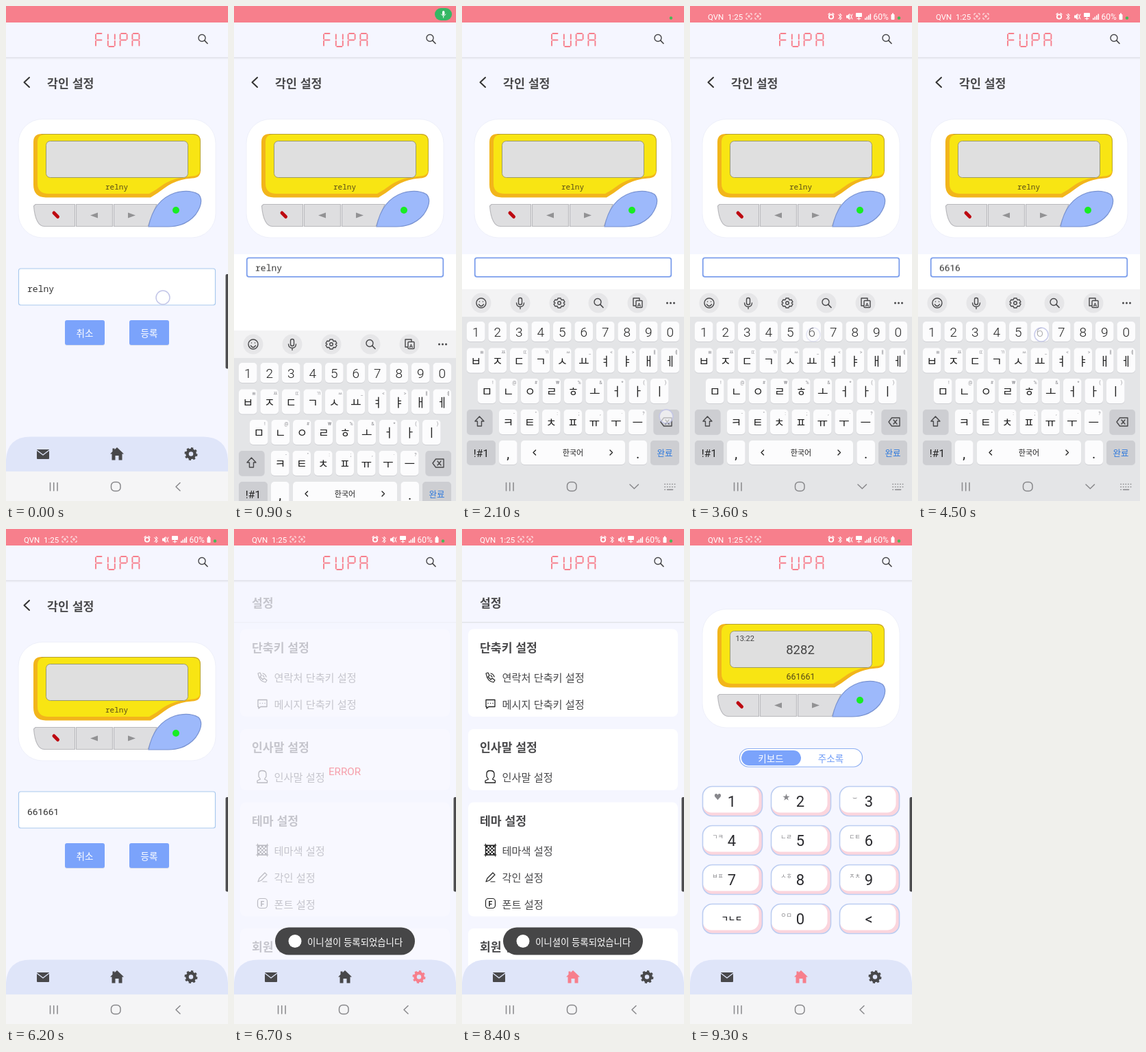
Write an HTML page that moves like this. It is 324 by 720 pixels and loops after 9800 ms.

```html
<!DOCTYPE html>
<html lang="ko">
<head>
<meta charset="utf-8">
<title>각인 설정</title>
<style>
html, body { margin: 0; width: 100%; height: 100%; overflow: hidden; background: #f5f6ff; }
svg { display: block; width: 100vw; height: 100vh; }
text { font-family: Roboto, "Noto Sans CJK KR", "Noto Sans CJK JP", "DejaVu Sans", sans-serif; dominant-baseline: central; white-space: pre; }
.mono { font-family: "Noto Sans Mono", monospace; }
.ko { font-family: "Noto Sans CJK KR", "Noto Sans CJK JP", sans-serif; transform: translateY(-1px); }
.bold { font-weight: 700; }
.thin { font-weight: 300; }
.mid { text-anchor: middle; }
.line { fill: none; stroke-linecap: round; stroke-linejoin: round; }
</style>
</head>
<body>
<svg id="stage" viewBox="0 0 324 720" preserveAspectRatio="none"></svg>
<script>
const LOOP = 9800;
const INK = '#48484a', BLUE = '#7ba3fb', PINK = '#f77f8c', PAPER = '#f5f6ff';
const OLD_NAME = 'relny', NEW_NAME = '661661';

// Drawing helpers
const text = (x, y, size, s, fill = INK, cls = '', extra = '') =>
  `<text x="${x}" y="${y}" font-size="${size}" fill="${fill}" class="${cls}" ${extra}>${s}</text>`;
const rect = (x, y, w, h, fill, r = 0, extra = '') =>
  `<rect x="${x}" y="${y}" width="${w}" height="${h}" rx="${r}" fill="${fill}" ${extra}/>`;
const shape = (d, fill, extra = '') => `<path d="${d}" fill="${fill}" ${extra}/>`;
const line = (d, color = INK, w = 1.4, extra = '') =>
  `<path class="line" d="${d}" stroke="${color}" stroke-width="${w}" ${extra}/>`;
const dot = (x, y, r, fill, extra = '') => `<circle cx="${x}" cy="${y}" r="${r}" fill="${fill}" ${extra}/>`;
const ring = (x, y, r, color = INK, w = 1.4, extra = '') =>
  dot(x, y, r, 'none', `stroke="${color}" stroke-width="${w}" ${extra}`);
const group = (id, body, extra = '') => `<g id="${id}" ${extra}>${body}</g>`;
const glass = (x, y, r, w) => ring(x - 1.5, y - 1.5, r, INK, w) + line(`M${x + 2.2} ${y + 2.2}l4.300 4.300`, INK, w + .3);

// Seven-segment wordmark
const SEGMENTS = ['M1.5 0H8.5', 'M10 1.5V8.5', 'M10 11.5V18.5', 'M1.5 20H8.5', 'M0 11.5V18.5', 'M0 1.5V8.5', 'M1.5 10H8.5'];
const LETTERS = { F: [0, 4, 5, 6], U: [1, 2, 3, 4, 5], P: [0, 1, 4, 5, 6], A: [0, 1, 2, 4, 5, 6] };
const wordmark = [...'FUPA'].map((c, i) =>
  line(LETTERS[c].map(k => SEGMENTS[k]).join(''), PINK, 1.9, `transform="translate(${131 + i * 17.8} 40) scale(1 .95)"`)).join('');

function pager(label, lcd = '') {
  const edge = 'stroke="#b9b9bd" stroke-width="1.2"';
  return rect(18, 164.5, 288, 172.5, '#fff', 35, 'stroke="#eef0fa"') +
    shape('M52 186H273Q284 186 284 197V239Q284 250 272 250.500Q248 252 231 265Q222 272 211 278.500H58Q40 278 40 260V198Q40 186 52 186Z', '#f2b51b') +
    shape('M57 187H273Q283.500 187 283.500 197V237Q283.500 247 272 247.500Q246 249 229 260Q220 267 209 273H62Q46 273 46 258V198Q46 187 57 187Z', '#f8e513') +
    line('M52 186.500H273Q283.500 187 283.500 197V240', '#a99c3a', .8) +
    rect(58.5, 196.500, 207, 53, '#dfdfdf', 6, 'stroke="#9b9a6c"') + lcd +
    text(161.5, 262, label === OLD_NAME ? 11 : 12.4, label, '#574a18', label === OLD_NAME ? 'mono mid' : 'mid') +
    shape('M43 288.500H100.500V320.500H56Q43 320 40.500 291Z', '#dedee0', edge) +
    shape('M102.500 288.500H155.500V320.500H102.500Z', '#dedee0', edge) +
    shape('M157.500 288.500H220L207 320.500H157.500Z', '#dedee0', edge) +
    line('M70 301L75.500 306.500', '#bd0711', 5) +
    shape('M123 304.500L134 300.500V308.500Z', '#929294') + shape('M189 304.500L178 300.500V308.500Z', '#929294') +
    shape('M208 321Q216 282 246 272Q267 266 281 274Q290 284 277 303Q262 321 237 321Z', '#9db9fb', 'stroke="#7892d1" stroke-width="1.2"') +
    dot(248, 297, 5, '#17ed22');
}

const house = shape('M162 642L172 651.500H169.500V660.500H164.500V654H159.500V660.500H154.500V651.500H152L155.500 648V643.500H158.500V645.300Z', 'inherit');
const gear = (x, y) => ring(x, y, 5.500, 'currentColor', 4.500) +
  ring(x, y, 8, 'currentColor', 3, 'pathLength="16" stroke-dasharray="1 1"');
const mail = rect(45, 645, 18, 14, INK, 1) + line('M45.500 646.500L54 653L62.500 646.500', '#dfe5f9', 1.3);
const navBar = (home, cog) =>
  shape('M0 677V660Q2 626.500 36 626.500H288Q322 627 324 660V677Z', '#dfe5f9') + mail +
  `<g id="${home}" fill="${INK}">${house}</g><g id="${cog}" color="${INK}">${gear(270, 651.500)}</g>`;
const bars = line('M64.500 693.500V705M69.700 693.500V705M75 693.500V705', '#88888b', 1.5);
const square = rect(153.500, 692.500, 13.500, 13, 'none', 5, 'stroke="#88888b" stroke-width="1.500"');
const systemIcons = bars + square + line('M254 693.500L248 699.300L254 705', '#88888b', 1.5);

const statusBar = rect(0, 0, 324, 24, PINK) + group('status',
  text(26, 15.500, 11.500, 'QVN  1:25', '#fff') +
  [86, 99].map(x => line(`M${x - 4} 13v-2h2M${x + 2} 11h2v2M${x + 4} 17v2h-2M${x - 2} 19h-2v-2`, '#fff', .9) + ring(x, 15, 1.300, '#fff', .9)).join('') +
  ring(206, 15.500, 3.200, '#fff', 1.8) + line('M202 12l2-1.500M210 12l-2-1.500', '#fff', 1.3) +
  line('M216.500 12.500L221.500 17.500L219 20V11L221.500 13.500L216.500 18.500', '#fff', 1) +
  shape('M228 13.500h2l3-2.500v9l-3-2.500h-2Z', '#fff') + line('M234 12l3 7M237 12l-3 7', '#fff', 1) +
  rect(242, 10, 9, 6, '#fff', 1) + line('M244 18.500h5M246.500 16v4', '#fff', 1) +
  [0, 1, 2, 3].map(i => rect(255 + i * 2.500, 17.500 - i * 2, 1.600, 2.500 + i * 2, '#fff')).join('') +
  text(267.500, 15.500, 12, '60%', '#fff') + rect(293.500, 12, 5, 8, '#fff', 1) + rect(295, 10.500, 2, 2, '#fff')) +
  group('chip', rect(293, 3, 25, 18, '#35b764', 9) + rect(304, 7, 3.400, 6.500, '#fff', 1.700) + line('M302.500 12Q305.700 17 309 12M305.700 15v2', '#fff', 1)) +
  dot(305, 17.500, 2.200, '#46b956', 'id="privacy"');

const header = rect(0, 24, 324, 50.500, PAPER) + rect(0, 74.500, 324, 1.500, '#e1e2ea') + rect(0, 76, 324, 1.500, '#eff0f8') +
  wordmark + glass(287.500, 48, 5, 1.400);

const button = (x, s) => rect(x, 458, 58, 36, '#dadeea', 3) + rect(x, 457, 58, 36, BLUE, 3) +
  text(x + 29, 476, 13.5, s, '#fff', 'ko mid');
const letters = (s, id) => [...s].map((c, i) => `<tspan id="${id}${i}">${c}</tspan>`).join('');
const editor = rect(0, 76, 324, 551, PAPER) + line('M34 104L26.500 111L34 118', '#333', 2) +
  text(60, 112, 17.3, '각인 설정', INK, 'ko bold') + pager(OLD_NAME) +
  button(86, '취소') + button(180, '등록') +
  rect(0, 494, 324, 133, '#fff', 0, 'id="blank"') + rect(0, 361, 324, 134, '#fff', 0, 'id="sheet"') +
  rect(18.500, 382, 287, 53, '#fff', 3, 'id="field" stroke="#a9c9ee" stroke-width="1.200"') +
  rect(18.800, 366.300, 286.500, 27.500, '#fff', 3, 'id="shortField" stroke="#7d9fec" stroke-width="1.800"') +
  group('typed', text(31, 410.500, 13, letters(OLD_NAME, 'old'), '#333', 'mono') + text(31, 410.500, 13.7, letters(NEW_NAME, 'new'), '#333'));

const item = (y, s) => text(58.500, y, 15.2, s, INK, 'ko');
const heading = (y, s) => text(26, y, 17.2, s, INK, 'ko bold');
const checks = Array.from({ length: 13 }, (_, i) => rect(35 + (i * 2 % 5) * 2.500, 461 + Math.floor(i * 2 / 5) * 2.500, 2.500, 2.500, '#222')).join('');
const settings = rect(0, 135, 324, 1.500, '#e2e3e8') + heading(107, '설정') +
  [[145.500, 127.500], [291, 89], [397.500, 166], [581, 70]].map(([y, h]) => rect(9, y, 306, h, '#fff', 8)).join('') +
  heading(172, '단축키 설정') + item(216, '연락처 단축키 설정') + item(255, '메시지 단축키 설정') +
  heading(317, '인사말 설정') + item(361, '인사말 설정') +
  heading(424, '테마 설정') + item(468, '테마색 설정') + item(507, '각인 설정') + item(546, '폰트 설정') + heading(607, '회원 설정') +
  line('M35 210l3-1l2 4l-2 2l4 4l2-2l4 3l-2 3Q37 222 35 210M42 210Q46 211 47 215M42 213l2 2', '#222', 1.2) +
  line('M35 248.500H48V258.500H39L36 261V258.500H35ZM38 253.500h.1M41.500 253.500h.1M45 253.500h.1', '#222', 1.3) +
  line('M36 356Q36 351.500 41 351.500Q47 351.500 47 356V360L44.500 364L48.500 366V369H34V366L38.500 364L36 360Z', '#222', 1.3) +
  rect(34.500, 460.500, 14, 13.500, 'none', 0, 'stroke="#222" stroke-width="1.300"') + checks +
  line('M32.500 460H50M32.500 474H50M34.500 458V476M48.500 458V476', '#222', 1.1) +
  line('M35 513L37 508L45 500L48 503L40 511ZM42 513h6', '#222', 1.2) +
  rect(34.500, 537.500, 14, 14, 'none', 4, 'stroke="#222" stroke-width="1.200"') + text(41.500, 545, 10.5, 'F', '#222', 'mid bold');

const HINTS = ['♥', '★', '⌣', 'ㄱㅋ', 'ㄴㄹ', 'ㄷㅌ', 'ㅂㅍ', 'ㅅㅎ', 'ㅈㅊ', '', 'ㅇㅁ', ''];
const dialPad = ['1', '2', '3', '4', '5', '6', '7', '8', '9', 'ㄱㄴㄷ', '0', '&lt;'].map((s, i) => {
  const x = 18.500 + i % 3 * 100, y = 374.500 + Math.floor(i / 3) * 57;
  return rect(x, y, 87, 43, '#fbd5dd', 14) + rect(x, y, 82, 38, '#fff', 13) +
    rect(x, y, 87, 43, 'none', 14, 'stroke="#bccdf1" stroke-width="1.600"') +
    text(x + 22, y + 16, i < 3 ? 11 : 9, HINTS[i], '#88888c', 'mid') +
    text(x + 42.500, y + 21.500, i === 9 ? 11 : 22, s, '#29292d', i === 9 ? 'mid bold' : 'mid');
}).join('');
const lcd = text(66.500, 207, 11, '13:22', '#444') + text(161, 224, 18.5, '8282', '#444', 'mid');
const home = rect(0, 76, 324, 551, PAPER) + `<g transform="translate(0 -48)">${pager(NEW_NAME, lcd)}</g>` +
  rect(72.500, 319.500, 179, 26.500, '#fff', 13, 'stroke="#8eaff2" stroke-width="1.200"') + rect(75, 322, 87, 22, BLUE, 11) +
  text(118, 334, 13.5, '키보드', '#fff', 'ko mid') + text(205.500, 334, 13.5, '주소록', '#719df7', 'ko mid') + dialPad;

// Keyboard
const DARK_KEY = '#cdced2';
const key = (x, y, w, s, size = 18, h = 36, fill = '#fcfcfd', color = '#222', cls = '') =>
  rect(x, y + 1, w, h, '#d0d1d5', 5) + rect(x, y, w, h, fill, 5) + text(x + w / 2, y + h / 2 + 1, size, s, color, 'mid ' + cls);
const row = (x, y, keys, hints = [], h = 36) => [...keys].map((s, i) =>
  key(x + i * 31.500, y, 26.500, s, h < 36 ? 19 : 17, h, '#fcfcfd', '#222', h < 36 ? 'thin' : '') +
  text(x + i * 31.500 + 22, y + 6, 7, hints[i] || '', '#909095', 'mid')).join('');
const toolbar = [28, 85, 142, 199, 256].map(x => dot(x, 432, 14.500, '#e6e6e8')).join('') +
  ring(28, 432, 7) + line('M24.500 434Q28 439 31.500 434M25.500 430h.1M30.500 430h.1') +
  rect(82.500, 424.500, 5, 10, 'none', 2.500, `stroke="${INK}" stroke-width="1.400"`) + line('M79.500 432Q80 437.500 85 437.500Q90 437.500 90.500 432M85 438v2.500') +
  ring(142, 432, 2.300) + line('M140 425h4l1 2.500l3-.3l2 3.300l-2 1.500l2 1.500l-2 3.300l-3-.3l-1 2.500h-4l-1-2.500l-3 .3l-2-3.300l2-1.500l-2-1.500l2-3.300l3 .3Z') +
  glass(199.500, 432, 5, 1.400) +
  line('M254 436H250V425H259V428') + rect(254, 428.500, 9, 10, '#e6e6e8', 1, `stroke="${INK}" stroke-width="1.400"`) +
  text(258.500, 434, 8, 'A', INK, 'mid bold') + [299.500, 304.500, 309.500].map(x => dot(x, 432, 1.500, INK)).join('');
const keyboard = rect(0, 412, 324, 40, '#f3f3f4') + rect(0, 452, 324, 268, '#e4e5e7') + toolbar +
  row(7, 459, '1234567890', [], 29) +
  row(7, 497.500, 'ㅂㅈㄷㄱㅅㅛㅕㅑㅐㅔ', ['ㅃ', 'ㅉ', 'ㄸ', 'ㄲ', 'ㅆ', '_', '&lt;', '&gt;', 'ㅒ', 'ㅖ']) +
  row(23, 542, 'ㅁㄴㅇㄹㅎㅗㅓㅏㅣ', [...'!@#₩%&*()'].map(c => c === '&' ? '&amp;' : c)) +
  row(54, 587, 'ㅋㅌㅊㅍㅠㅜㅡ', [...'-":;,·?']) +
  key(7, 587, 37.500, '', 17, 36, DARK_KEY) + line('M25.500 597L19 604H22.500V611H28.500V604H32Z') +
  key(279.500, 587, 37.500, '', 17, 36, DARK_KEY) +
  line('M290 605L294.500 599H306V611H294.500ZM297 602l5 6M302 602l-5 6') +
  key(7, 632, 42, '!#1', 15.5, 35, DARK_KEY) + key(54, 632, 26.500, ',', 20, 35) + key(86, 632, 152, '한국어', 11, 35) +
  line('M107.500 646L104 649.500L107.500 653M216 646L219.500 649.500L216 653', '#222') +
  key(243.500, 632, 26.500, '.', 20, 35) + key(275, 632, 42, '완료', 12.5, 35, DARK_KEY, '#2d79dd') +
  bars + square + line('M245 696L251.300 702L257.500 696', '#88888b', 1.500) +
  [0, 1, 2].map(r => line(`M296 ${695.500 + r * 4}H311`, '#88888b', 1.600, `stroke-dasharray="${r < 2 ? '.3 3.300' : '.3 3.300 8 4'}"`)).join('');

const toast = rect(60, 579.500, 204, 40, '#464647', 20) + dot(89, 599.500, 9.500, '#fff') +
  text(107, 600.500, 13.4, '이니셜이 등록되었습니다', '#fff', 'ko');

document.getElementById('stage').innerHTML =
  rect(0, 0, 324, 720, PAPER) + group('settings', settings) + group('home', home) + group('editor', editor) +
  text(161.500, 352.500, 15.2, 'ERROR', '#f56f7d', 'mid', 'id="error"') +
  header + statusBar + navBar('homeTab', 'gearTab') + rect(0, 677, 324, 43, '#f5f5f6') + systemIcons +
  group('toast', toast) + rect(320.500, 390, 6, 137.500, '#4c4c4e', 2, 'id="handle"') +
  group('keyboard', keyboard) + group('ghost', navBar('ghostHome', 'ghostGear') + systemIcons) +
  dot(0, 0, 10, '#ffffffb0', 'id="touch" stroke="#c3c6e8" stroke-width="1.500"');

// Each row holds a start time and the values taken every 100 ms from there on.
function track(id, prop, ...rows) {
  const frames = rows.flatMap(([start, ...values]) => values.map((value, i) =>
    ({ offset: (start + i * 100) / LOOP, [prop]: value, easing: 'step-end' })));
  frames.push({ ...frames.at(-1), offset: 1 });
  document.getElementById(id).animate(frames, { duration: LOOP, iterations: Infinity });
}
const fade = (id, ...rows) => track(id, 'opacity', ...rows);
const at = (x, y) => `translate(${x}px, ${y}px)`;

fade('chip', [0, 0], [100, .3, .7, 1], [1700, .8, .5, .2, 0]);
fade('privacy', [0, 0], [1900, 1]);
fade('status', [0, 0], [2300, .2, .4, .6, .8, .9, 1]);

track('field', 'stroke', [0, '#a9c9ee'], [200, '#7d9fec'], [6100, '#a9c9ee']);
track('field', 'strokeWidth', [0, '1.2px'], [200, '1.8px'], [6100, '1.2px']);
fade('field', [0, 1], [900, 0], [5300, 1]);
fade('shortField', [0, 0], [900, 1], [5300, 0]);
fade('sheet', [0, 0], [900, 1], [5300, 0]);
fade('blank', [0, 0], [800, 1], [5400, 0]);
track('typed', 'transform', [0, at(0, 0)], [900, at(0, -30.500)], [5300, at(0, 0)]);
[...OLD_NAME].forEach((_, i) => track('old' + i, 'fillOpacity', [0, 1], [2100 - i * 100, 0]));
[3700, 3900, 4200, 4500, 4700, 4900].forEach((time, i) => track('new' + i, 'fillOpacity', [0, 0], [time, 1]));

track('keyboard', 'transform', [0, at(0, 320)], [800, at(0, 190), at(0, 60), at(0, 0)], [5300, at(0, 133), at(0, 270), at(0, 320)]);
fade('keyboard', [0, 1], [5400, .3, 1]);
fade('ghost', [0, 0], [5300, .3, 0]);
fade('handle', [0, 1], [800, 0], [5500, 1]);

track('touch', 'transform', [0, at(229, 424)], [1200, at(298, 597)], [3300, at(180, 478)], [4100, at(20, 474)],
  [4400, at(180, 478)], [4800, at(20, 474)], [5000, at(296, 650)], [5700, at(208, 475)], [7800, at(161, 651)]);
fade('touch', [0, 1], [200, .9, .6, .3, 0], [1700, .9], [2300, .8, .6, .4, .2, 0],
  [3400, .2, .3, .4, .9, .4, .9, .4, .4, .9, .4, .4, .9, .4, .9, .4, .9, .9, .4, 0],
  [5700, .9, .9], [6000, .6, .3, 0], [7800, .5, .9, .6, .2], [8300, 0]);

fade('editor', [0, 1], [6300, .7, .3, 0]);
fade('settings', [0, 0], [6700, .28, .7, 1], [8500, .65, .25, 0]);
fade('error', [0, 0], [6500, .4, .8, .65, .2, 0]);
fade('toast', [0, 0], [6300, .4, .8, 1], [8600, .6, .3, 0]);
fade('home', [0, 0], [8700, .25, .6, .9, 1]);
track('gearTab', 'color', [0, INK], [6300, PINK], [8000, INK]);
track('homeTab', 'fill', [0, INK], [8000, PINK]);
</script>
</body>
</html>
```
